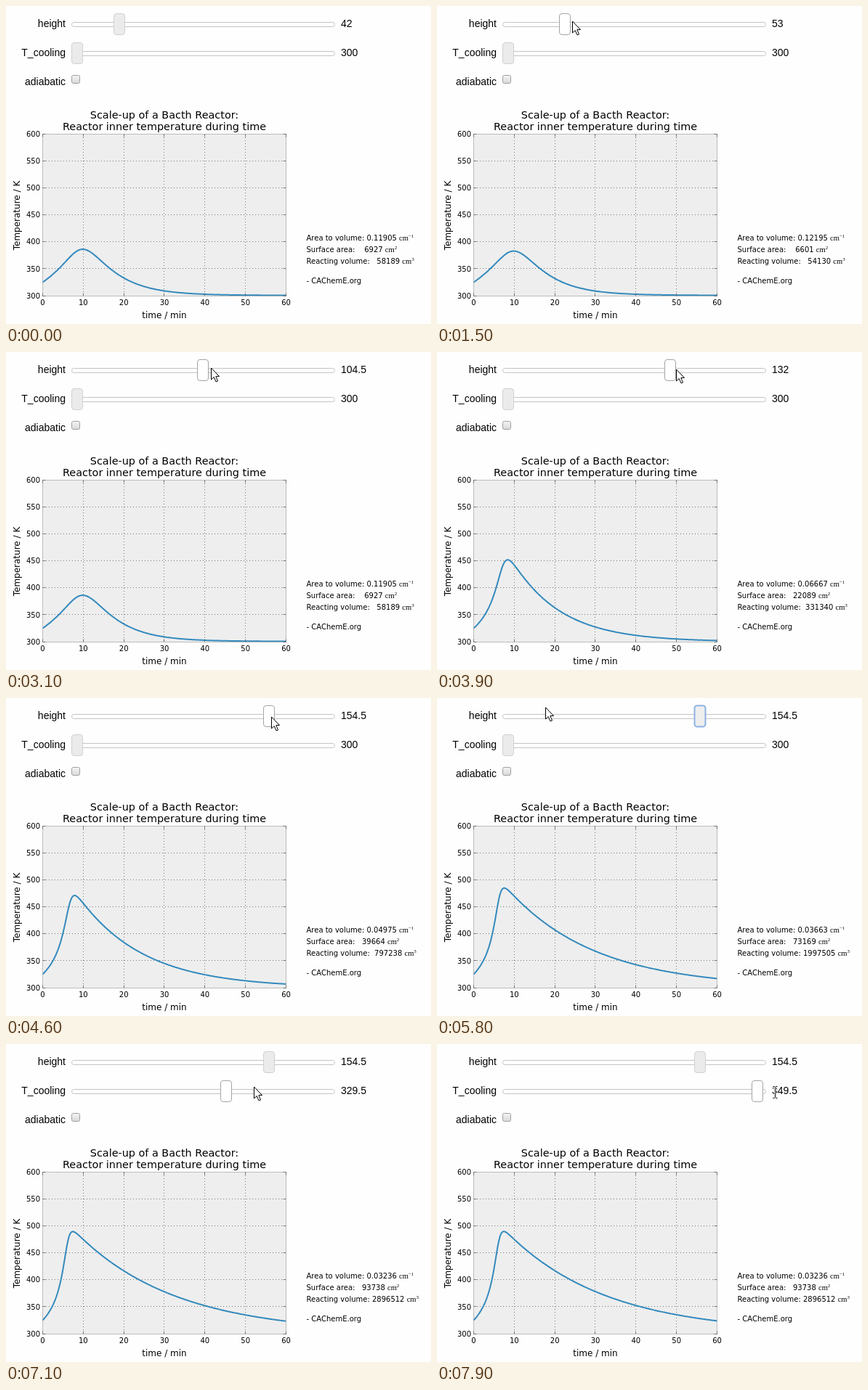
An HTML page that plays this animation: 585 px wide and 438 px high, repeating every 8 s.

```html
<!DOCTYPE html>
<html lang="en">
<head>
<meta charset="utf-8">
<title>Batch reactor sliders</title>
<style>
  html, body { margin: 0; width: 100%; height: 100%; overflow: hidden; background: #fefefe; }
  svg { display: block; width: 585px; height: 438px; }
  text { white-space: pre; fill: #000; }
  .ui { font: 14px "Liberation Sans", sans-serif; }
  .plot { font: 10px "DejaVu Sans", sans-serif; }
  .axis { font-size: 12px; }
  .title { font-size: 14.4px; }
  .unit { font: 10.5px "Liberation Serif", serif; }
  .sup { font-size: 7px; }
  .mid { text-anchor: middle; }
  .end { text-anchor: end; }
  .track { fill: #fff; stroke: #c4c4c4; }
  .handle { fill: #ebebeb; stroke: #d0d0d0; }
  .handle.hover { fill: #dedede; stroke: #999; }
  .handle.active { fill: #fff; stroke: #a4a4a4; }
  .handle.focus { fill: #eee; stroke: #8db2e6; stroke-width: 2; }
  .grid { stroke: #777; stroke-dasharray: 1 3; }
  .tick { stroke: #555; stroke-width: .7; fill: none; }
  #curve { fill: none; stroke: #348abd; stroke-width: 2; stroke-linejoin: round; }
</style>
</head>
<body>
<svg viewBox="0 0 585 438">
  <defs>
    <linearGradient id="box" x2="0" y2="1">
      <stop stop-color="#f4f4f4"/><stop offset="1" stop-color="#d8d8d8"/>
    </linearGradient>
    <clipPath id="area"><rect x="50.5" y="176.5" width="335" height="223"/></clipPath>
  </defs>

  <g class="ui">
    <text class="end" x="82" y="29">height</text>
    <text class="end" x="82" y="69">T_cooling</text>
    <text class="end" x="82" y="109">adiabatic</text>
    <rect class="track" x="90.5" y="22.5" width="362" height="6" rx="3"/>
    <rect class="track" x="90.5" y="62.5" width="362" height="6" rx="3"/>
    <rect id="hHandle" class="handle" y="10.5" width="15" height="29" rx="3.5"/>
    <rect id="tHandle" class="handle" y="50.5" width="15" height="29" rx="3.5"/>
    <text id="hValue" x="461" y="29"></text>
    <text id="tValue" x="461" y="69"></text>
    <rect x="90.5" y="95.5" width="11" height="11" rx="2" fill="url(#box)" stroke="#a0a0a0"/>
  </g>

  <g class="plot">
    <rect x="50.5" y="176.5" width="335" height="223" fill="#eee"/>
    <g id="axes"></g>
    <rect x="50.5" y="176.5" width="335" height="223" fill="none" stroke="#bcbcbc"/>
    <path id="curve" clip-path="url(#area)"/>
    <path id="ticks" class="tick"/>
    <text class="title mid" x="218" y="155">Scale-up of a Bacth Reactor:</text>
    <text class="title mid" x="218" y="171">Reactor inner temperature during time</text>
    <text class="axis mid" x="218" y="430">time / min</text>
    <text class="axis mid" transform="translate(18.5 288.5) rotate(-90)">Temperature / K</text>
    <text x="413.5" y="323"><tspan id="ratio"></tspan><tspan class="unit">cm<tspan class="sup" dy="-4">−1</tspan></tspan></text>
    <text x="413.5" y="339"><tspan id="surface"></tspan><tspan class="unit">cm<tspan class="sup" dy="-4">2</tspan></tspan></text>
    <text x="413.5" y="355"><tspan id="volume"></tspan><tspan class="unit">cm<tspan class="sup" dy="-4">3</tspan></tspan></text>
    <text x="413.5" y="382">- CAChemE.org</text>
  </g>

  <path id="arrow" d="M0 0V16L3.7 12.6L6.6 19L9 18L6.3 11.6H11Z" fill="#fff" stroke="#000" stroke-linejoin="round"/>
  <g id="beam" fill="none">
    <path d="M-3 -8H3M0 -8V8M-3 8H3" stroke="#fff" stroke-width="3"/>
    <path d="M-3 -8H-1L0 -7L1 -8H3M0 -7V7M-3 8H-1L0 7L1 8H3" stroke="#000"/>
  </g>
</svg>

<script>
const LOOP = 8000, STEP = 100;
const $ = id => document.getElementById(id);
const px = min => 50.5 + min * 335 / 60;
const py = kelvin => 399.1 - (kelvin - 300) * 223 / 300;

// Each row is [ms, value, ...]
const HEIGHT = [[1000, 42], [1100, 41], [1200, 43.5], [1500, 53], [3100, 104.5], [4500, 152.5], [4600, 154.5]];
const COOLING = [[6500, 300], [7100, 329.5], [7200, 335], [7900, 349.5]];
const POINTER = [
  [400, 152, -12], [500, 154, 2], [800, 158, 20], [1000, 158, 20], [1500, 186, 21],
  [3100, 282, 22], [4500, 364, 25], [4600, 365, 26], [5600, 365, 26], [5700, 255, 4],
  [5800, 149, 13], [6100, 105, 50], [6300, 97, 60], [6500, 102, 60], [7100, 341, 59],
  [7800, 441, 64], [7900, 465, 66]
];
// The model answers later than the sliders move
const SOLVED_HEIGHT = [[0, 42], [1200, 41], [2300, 42], [3300, 58], [3900, 75], [4300, 100.5],
  [4900, 116], [5300, 136.5], [6100, 154.5]];
const SOLVED_COOLING = [[0, 300], [6900, 300.5], [7500, 301]];
const H_STATE = [[0, ""], [500, "hover"], [1000, "active"], [5500, "focus"], [6400, ""]];
const T_STATE = [[0, ""], [6300, "hover"], [6500, "active"]];

function hold(keys, t) {
  let value = keys[0][1];
  for (const [at, v] of keys) if (t >= at) value = v;
  return value;
}

function tween(keys, t, col = 1) {
  if (t <= keys[0][0]) return keys[0][col];
  for (let i = 1; i < keys.length; i++) {
    const a = keys[i - 1], b = keys[i];
    if (t <= b[0]) return a[col] + (b[col] - a[col]) * (t - a[0]) / (b[0] - a[0]);
  }
  return keys[keys.length - 1][col];
}

// First-order exothermic reaction with wall cooling, midpoint integration
function solve(height, cooling) {
  const rise = 197, loss = 1.255 * 5 / height, dt = 0.05;
  const rate = (T, X) => 0.046 * Math.exp(3500 * (1 / 325 - 1 / T)) * (1 - X);
  let T = 325, X = 0, d = "M" + px(0) + " " + py(T);
  for (let i = 1; i <= 1200; i++) {
    const r = rate(T, X);
    const Tm = T + (rise * r - loss * (T - cooling)) * dt / 2;
    const rm = rate(Tm, X + r * dt / 2);
    T += (rise * rm - loss * (Tm - cooling)) * dt;
    X += rm * dt;
    if (i % 4 === 0) d += "L" + px(i * dt).toFixed(2) + " " + py(T).toFixed(2);
  }
  return d;
}

function drawAxes() {
  const snap = v => Math.ceil(v) - .5;
  let grid = "", ticks = "";
  for (let i = 0; i <= 6; i++) {
    const x = px(i * 10), y = py(300 + i * 50);
    const gx = snap(x), gy = snap(y);
    grid += `<path class="grid" d="M${gx} 177V399M51 ${gy}H385"/>`;
    grid += `<text class="mid" x="${x}" y="412">${i * 10}</text>`;
    grid += `<text class="end" x="47" y="${y + 3.7}">${300 + i * 50}</text>`;
    ticks += `M${gx} 399.5v-4M${gx} 176.5v4M50.5 ${gy}h4M385.5 ${gy}h-4`;
  }
  $("axes").innerHTML = grid;
  $("ticks").setAttribute("d", ticks);
}

function setSlider(id, value, min, max, state) {
  const left = 89.95 + (value - min) / (max - min) * 347;
  const handle = $(id + "Handle");
  handle.setAttribute("x", Math.round(left) + .5);
  handle.setAttribute("class", "handle " + state);
  $(id + "Value").textContent = Math.round(value * 2) / 2;
}

let solved = "";
function setResult(height, cooling) {
  const key = height + "/" + cooling;
  if (key === solved) return;
  solved = key;
  const volume = Math.PI / 4 * height ** 3, ratio = 5 / height;
  const pad = n => n.toFixed(0).padStart(7);
  $("curve").setAttribute("d", solve(height, cooling));
  $("ratio").textContent = `Area to volume: ${ratio.toFixed(5)} `;
  $("surface").textContent = `Surface area: ${pad(volume * ratio)} `;
  $("volume").textContent = `Reacting volume: ${pad(volume)} `;
}

function setPointer(t) {
  const x = Math.round(tween(POINTER, t)), y = Math.round(tween(POINTER, t, 2));
  const overText = x > 455;
  const show = (id, on, dy) => {
    $(id).style.display = on ? "" : "none";
    $(id).setAttribute("transform", `translate(${x + .5} ${y + dy})`);
  };
  show("arrow", t >= 400 && !overText, 0);
  show("beam", overText, .5);
}

function render(now) {
  const t = Math.floor((now - start) % LOOP / STEP) * STEP;
  setSlider("h", tween(HEIGHT, t), 10, 200, hold(H_STATE, t));
  setSlider("t", tween(COOLING, t), 300, 350, hold(T_STATE, t));
  setResult(hold(SOLVED_HEIGHT, t), hold(SOLVED_COOLING, t));
  setPointer(t);
}

const start = performance.now();
function tick() {
  render(performance.now());
  requestAnimationFrame(tick);
}
drawAxes();
tick();
</script>
</body>
</html>
```
